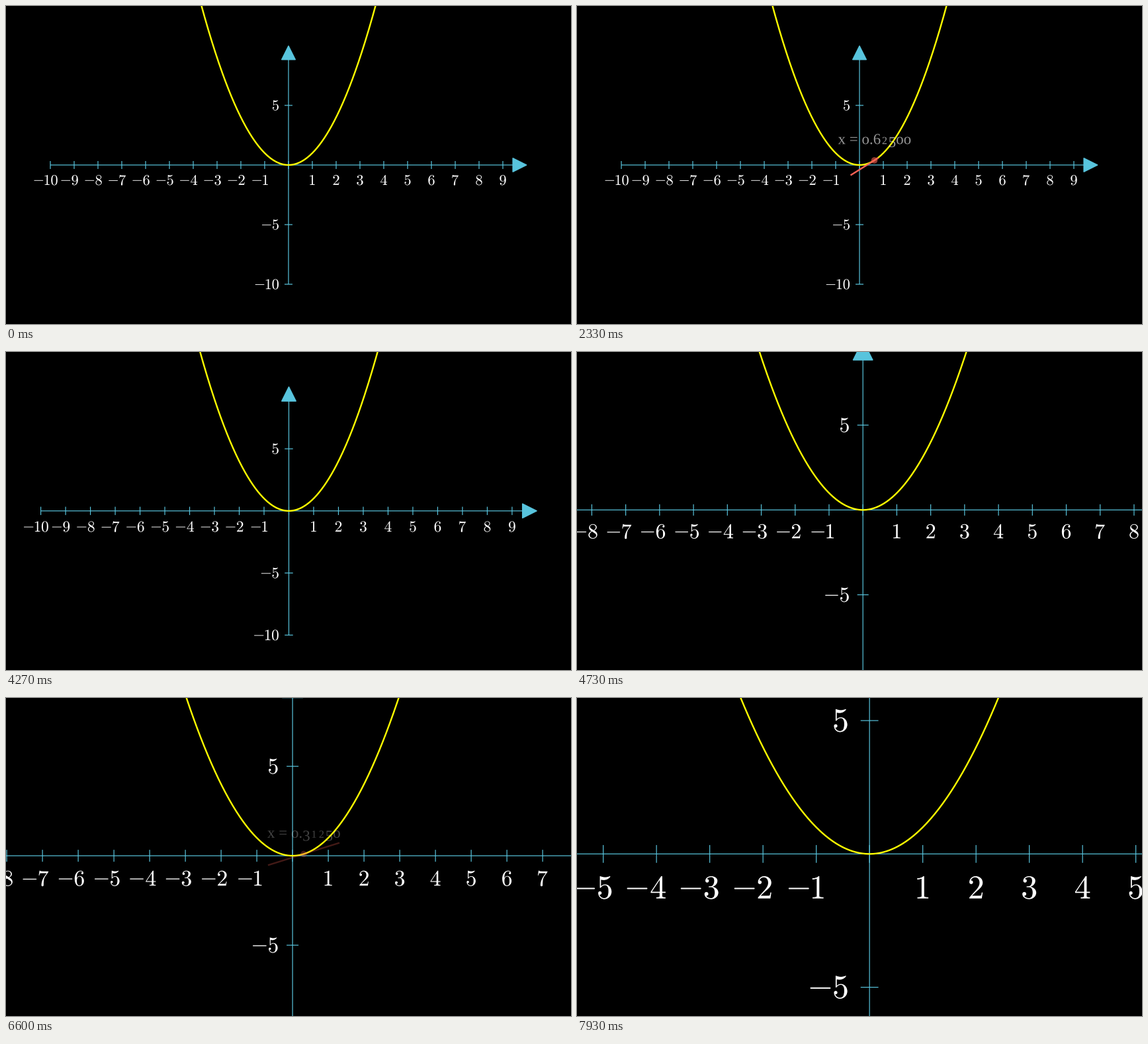
A matplotlib script that plays this animation: 854 by 480 pixels, repeating every 8000 ms.

```python
import numpy as np
import matplotlib.pyplot as plt
from matplotlib.animation import FuncAnimation
from matplotlib.collections import LineCollection, PolyCollection
from matplotlib.patches import Circle, PathPatch
from matplotlib.path import Path
from matplotlib.textpath import TextPath
from matplotlib.transforms import Affine2D

plt.rcParams["mathtext.fontset"] = "cm"

W, H, DPI = 854, 480, 64
FPS, SECONDS = 15, 8
BLUE, RED, YELLOW = "#58C4DD", "#FC6255", "#FFFF00"
THIN, THICK = 1.2 * 72 / DPI, 2.4 * 72 / DPI

CX, CY = 427, 240          # origin of the plot
UX, UY = 36, 18            # pixels per unit
PIVOT = (414.75, 243.75)   # fixed point of the zoom
GAP = 15                   # distance of tick labels from the axes
EM = 22.6
VALUE_EM = 23
DOT_R = 4.8

# start time and x of each iterate, and start times of the zooms
STEPS = [(0, 1.25), (2, 0.625), (5, 0.3125)]
ZOOMS = [4, 7]


def smooth(t):
    if t <= 0 or t >= 1:
        return float(t >= 1)
    sigmoid = lambda v: 1 / (1 + np.exp(-v))
    low = sigmoid(-5)
    return float(np.clip((sigmoid(10 * (t - 0.5)) - low) / (1 - 2 * low), 0, 1))


def to_stage(x, y):
    return CX + UX * x, CY - UY * y


def glyph(text, size, **font):
    path = TextPath((0, 0), text, size=size, prop=font or None)
    return path.transformed(Affine2D().scale(1, -1))


def moved(path, dx, dy):
    return path.transformed(Affine2D().translate(dx, dy))


def number(n):
    """Tick label set glyph by glyph, starting at x = 0 on the baseline."""
    parts, x = [], 0
    for ch in str(n):
        g = glyph(f"${ch}$", EM)
        box = g.get_extents()
        dy = -0.322 * EM - box.y0 if ch == "-" else 0
        parts.append(moved(g, x - box.x0, dy))
        x += box.width + 2.25
    return Path.make_compound_path(*parts)


def value_label(x):
    """Readout with old-style figures, centred on 0 and resting on y = 0."""
    parts, pen = [], 0
    for ch in f"x = {x:.5f}":
        advance = {" ": 0.25, ".": 0.25, "=": 0.564}.get(ch, 0.5) * VALUE_EM
        if ch != " ":
            size = VALUE_EM * (0.7 if ch in "12" else 1)
            g = glyph("o" if ch == "0" else ch, size, family="Liberation Serif")
            dx = (advance - 0.5 * size) / 2 if ch in "12" else 0
            dy = 0.2 * VALUE_EM if ch in "34579" else 0
            parts.append(moved(g, pen + dx, dy))
        pen += advance
    path = Path.make_compound_path(*parts)
    box = path.get_extents()
    return moved(path, -(box.x0 + box.x1) / 2, -box.y1)


def tick_labels():
    minus = glyph("$-$", EM).get_extents().width
    labels = []
    for n in range(-10, 10):
        if n:
            p = number(n)
            b = p.get_extents()
            x = CX + UX * n - (minus / 2 if n < 0 else 0)
            labels.append(moved(p, x - (b.x0 + b.x1) / 2, CY + GAP - b.y0))
    for n in (5, -5, -10):
        p = number(n)
        b = p.get_extents()
        labels.append(moved(p, CX - GAP - b.x1, CY - UY * n - (b.y0 + b.y1) / 2))
    return Path.make_compound_path(*labels)


fig = plt.figure(figsize=(W / DPI, H / DPI), dpi=DPI, facecolor="black")
ax = fig.add_axes([0, 0, 1, 1])
ax.set_xlim(0, W)
ax.set_ylim(H, 0)
ax.axis("off")
ax.set_autoscale_on(False)

zoom = Affine2D()
zoomed = zoom + ax.transData

# axes, ticks and arrow tips
lines = [[(CX - 360, CY), (CX + 340, CY)], [(CX, CY + 180), (CX, CY - 160)]]
lines += [[(CX + UX * n, CY - 6), (CX + UX * n, CY + 6)] for n in range(-10, 10)]
lines += [[(CX - 6, CY - UY * n), (CX + 6, CY - UY * n)] for n in (-10, -5, 5)]
tips = [
    [(CX + 339, CY - 10.5), (CX + 360, CY), (CX + 339, CY + 10.5)],
    [(CX - 10.5, CY - 159), (CX, CY - 180), (CX + 10.5, CY - 159)],
]
axis_art = LineCollection(lines, colors=BLUE, linewidths=THIN, transform=zoomed,
                          capstyle="butt", zorder=1)
axis_art.set_snap(False)
tip_art = PolyCollection(tips, facecolors=BLUE, edgecolors=BLUE, linewidths=THIN,
                         transform=zoomed, joinstyle="miter", zorder=1)
tip_art.set_snap(False)
ax.add_collection(axis_art, autolim=False)
ax.add_collection(tip_art, autolim=False)
ax.add_patch(PathPatch(tick_labels(), fc="white", lw=0, transform=zoomed, zorder=2))

xs = np.linspace(-5, 5, 401)
ax.plot(*to_stage(xs, xs ** 2), color=YELLOW, lw=THICK, transform=zoomed, zorder=3)

# moving parts
dot = ax.add_patch(Circle((0, 0), DOT_R, fc=RED, lw=0, zorder=4))
tangent, = ax.plot([], [], color=RED, lw=THICK, transform=zoomed,
                   solid_capstyle="butt", zorder=5)
values = {x: value_label(x) for _, x in STEPS}
readout = ax.add_patch(PathPatch(values[1.25], fc="white", lw=0, zorder=6))


def draw(i):
    t = i / FPS
    scale = np.prod([1 + 0.5 * smooth(t - start) for start in ZOOMS])
    px, py = PIVOT
    zoom.clear().translate(-px, -py).scale(scale).translate(px, py)

    start, x = [s for s in STEPS if s[0] <= t][-1]
    shown = smooth((t - start) / 0.5)
    left = 1 - smooth(t - start - 1)

    dot.center = dx, dy = zoom.transform(to_stage(x, x * x))
    ends = np.array([x - 1, x - 1 + 2 * shown])
    tangent.set_data(*to_stage(ends, x * x + 2 * x * (ends - x)))
    readout.set_path(moved(values[x], dx, dy - DOT_R - GAP))

    dot.set_alpha(shown * left)
    readout.set_alpha(shown * left)
    tangent.set_alpha(left)
    return dot, tangent, readout


anim = FuncAnimation(fig, draw, frames=FPS * SECONDS, interval=1000 / FPS,
                     repeat=True, repeat_delay=0, blit=False)
plt.show()
```
